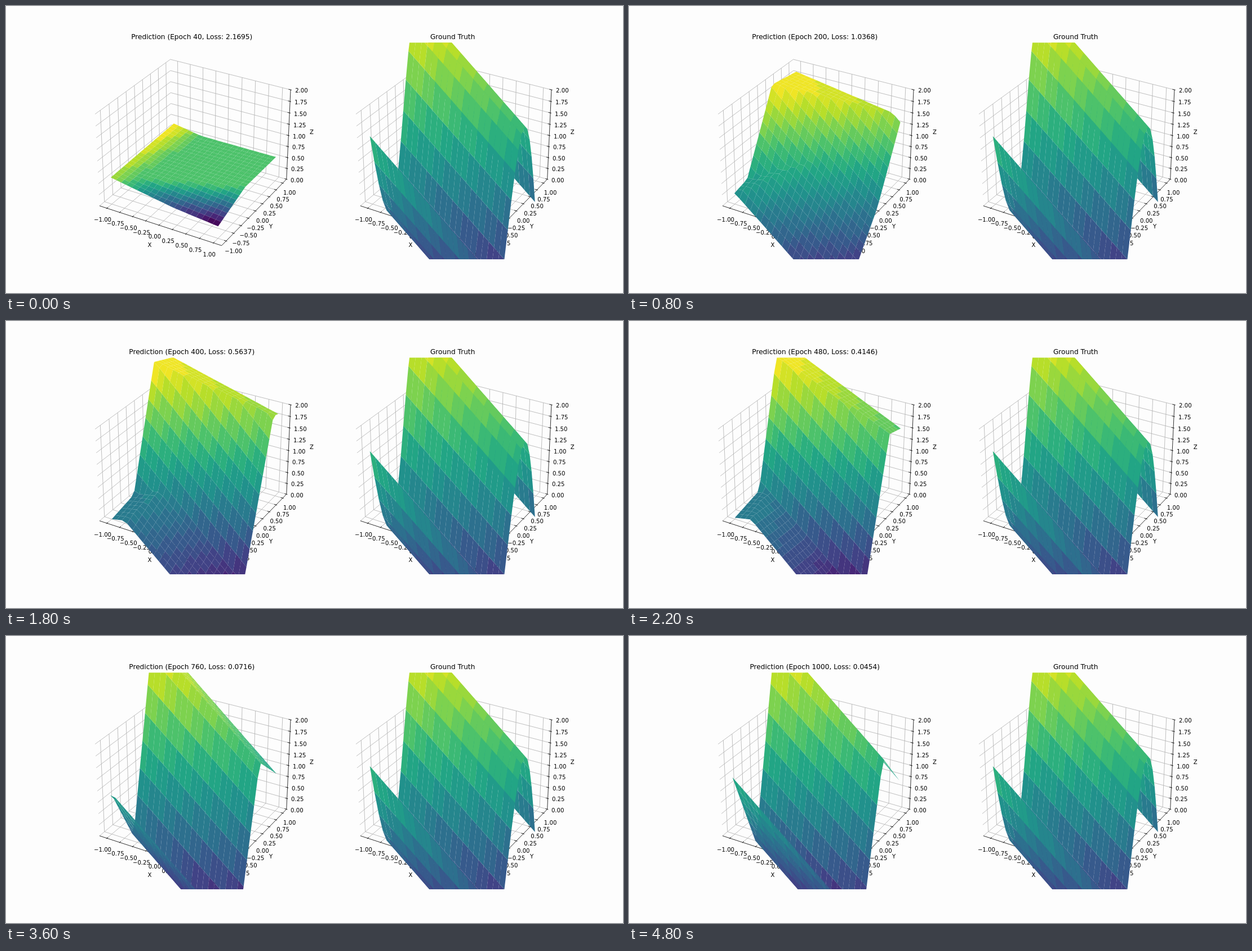
An HTML page with a canvas for the animation above (5 s loop, 1095 by 511 pixels).

```html
<!DOCTYPE html>
<html lang="en">
<head>
<meta charset="utf-8">
<title>Surface fit</title>
<style>
html, body { margin: 0; width: 100%; height: 100%; overflow: hidden; background: #fdfdfd; }
canvas { display: block; }
</style>
</head>
<body>
<canvas id="stage" width="1095" height="511"></canvas>
<script>
const ctx = document.getElementById('stage').getContext('2d');
const STEP = 200, FRAMES = 25;
const SIDE = 385.74, LEFT = 136.875, TOP = 65.18, GAP = 462.89;
const SCALE = SIDE / 0.185;
const N = 21, LEVELS = 23;
const EDGE = 25 / 24;              // pane position in box units
const TICK = 1 / 6;                // tick length unit
const LABEL = EDGE + 0.1209;       // tick labels
const NAME = EDGE + 0.2628;        // axis names
const FONT = '"DejaVu Sans", sans-serif';

// The fit is a steep wall between a floor and a roof.
// Each plane is [height at centre, slope in x, slope in y]; cap limits the floor.
const KEYS = [
  { at: 0, loss: 2.1695, cap: 0.6, floor: [0.43, -0.2, 0.03], wall: [0.7, -0.118, 0.316], roof: [0.55, 0, 0] },
  { at: 2, loss: 1.2680, cap: 0.43, floor: [0.7, -0.95, 1.35], wall: [0.7, -0.95, 1.35], roof: [1.25, -0.25, 0] },
  { at: 7, loss: 0.7665, cap: -0.03, floor: [0.27, -1.02, 1.1], wall: [0.07, -1.25, 2.85], roof: [2.6, -0.1, -0.35] },
  { at: 11, loss: 0.4146, cap: 0.03, floor: [-0.73, -1.09, -0.1], wall: [0.185, -1.03, 4.2], roof: [2.32, -0.55, -0.25] },
  { at: 14, loss: 0.2368, cap: 0.29, floor: [-1.14, -1.15, -0.7], wall: [0.5, -1, 5.2], roof: [2.68, -0.95, -0.69] },
  { at: 18, loss: 0.0716, cap: 0.87, floor: [-2.25, -1, -2.2], wall: [0.5, -1, 5.5], roof: [2.8, -1, -0.95] },
  { at: 24, loss: 0.0454, cap: 1.26, floor: [-2.74, -1, -3], wall: [0.5, -1, 5.6], roof: [3.03, -1, -1.33] }
];

const lerp = (a, b, k) => a + (b - a) * k;
const mix = (p, q, k) => p.map((v, i) => lerp(v, q[i], k));
const plane = (p, x, y) => p[0] + p[1] * x + p[2] * y;

function stateAt(frame) {
  const i = Math.max(1, KEYS.findIndex(key => key.at >= frame));
  const a = KEYS[i - 1], b = KEYS[i];
  const k = (frame - a.at) / (b.at - a.at);
  return {
    loss: a.loss * (b.loss / a.loss) ** k,
    cap: lerp(a.cap, b.cap, k),
    floor: mix(a.floor, b.floor, k),
    wall: mix(a.wall, b.wall, k),
    roof: mix(a.roof, b.roof, k)
  };
}

const predict = s => (x, y) => {
  const cap = s.cap + 0.25 * (x + 1) + 0.2 * (y + 1);
  return Math.max(
    Math.min(plane(s.floor, x, y), cap),
    Math.min(plane(s.wall, x, y), plane(s.roof, x, y)));
};

const truth = (x, y) => 2 * Math.sin(Math.PI * y) - x + 0.5;

const VIRIDIS = ['440154', '482475', '414487', '355f8d', '2a788e', '21918c',
  '22a884', '44bf70', '7ad151', 'bddf26', 'fde725']
  .map(h => [0, 2, 4].map(i => parseInt(h.slice(i, i + 2), 16)));

function tint(t) {
  const level = Math.min(LEVELS - 1, Math.floor(t * LEVELS));
  const pos = (level + 0.5) / LEVELS * 10, i = Math.floor(pos);
  return `rgb(${mix(VIRIDIS[i], VIRIDIS[i + 1], pos - i).map(Math.round)})`;
}

// Box units (-1..1 per axis) to screen, camera at elevation 30, azimuth -60.
const C = Math.sqrt(3) / 2;
function project(a, b, c) {
  const x = a * 4 / 7, y = b * 4 / 7, z = c * 3 / 7;
  const depth = 10 - (x * C / 2 - y * 0.75 + z / 2);
  const u = (x * C + y / 2) / depth;
  const v = (-x / 4 + y * C / 2 + z * C) / depth;
  return [LEFT + (u + 0.095) * SCALE, TOP + SIDE - (v + 0.095) * SCALE, depth];
}

const flat = v => v / 1.1;
const tall = v => (v - 1) * EDGE;

function path(points) {
  ctx.beginPath();
  for (const p of points) ctx.lineTo(p[0], p[1]);
}

function line(color, ...points) {
  path(points.map(p => project(...p)));
  ctx.strokeStyle = color;
  ctx.lineWidth = 0.81;
  ctx.stroke();
}

function text(str, x, y, size = 10.14) {
  ctx.font = `${size}px ${FONT}`;
  ctx.fillText(str, x, y);
}

const E = EDGE;
const AXES = [
  { name: 'X', unit: flat, from: -1, grid: v => [[v, -E, -E], [v, E, -E], [v, E, E]],
    at: (v, d) => [v, -d, -d], tick: (v, d) => [v, -d, -E] },
  { name: 'Y', unit: flat, from: -1, grid: v => [[E, v, -E], [-E, v, -E], [-E, v, E]],
    at: (v, d) => [d, v, -d], tick: (v, d) => [d, v, -E] },
  { name: 'Z', unit: tall, from: 0, grid: v => [[-E, -E, v], [-E, E, v], [E, E, v]],
    at: (v, d) => [d, d, v], tick: (v, d) => [d, E, v] }
];

function eachTick(axis, fn) {
  for (let i = 0; i < 9; i++) {
    const value = axis.from + i / 4;
    fn(axis.unit(value), value);
  }
}

function drawAxes() {
  for (const axis of AXES) eachTick(axis, v => line('#b0b0b0', ...axis.grid(v)));
  ctx.fillStyle = '#000';
  ctx.textAlign = 'center';
  for (const axis of AXES) {
    line('#000', axis.at(-E, E), axis.at(E, E));
    eachTick(axis, (v, value) => {
      line('#000', axis.tick(v, E + TICK * 0.1), axis.tick(v, E - TICK * 0.2));
      const [x, y] = project(...axis.at(v, LABEL));
      text(value.toFixed(2).replace('-', '\u2212'), x, y + 7.7);
    });
    const [x, y] = project(...axis.at(0, NAME));
    text(axis.name, x, y + 2.8);
  }
}

function drawSurface(fn) {
  const grid = [];
  for (let k = 0; k < N * N; k++) {
    const x = (k % N) / 10 - 1, y = Math.floor(k / N) / 10 - 1, z = fn(x, y);
    grid.push({ z, p: project(flat(x), flat(y), tall(z)) });
  }
  const cells = [];
  for (let j = 0; j < N - 1; j++) {
    for (let i = 0; i < N - 1; i++) {
      const k = j * N + i;
      const q = [grid[k], grid[k + 1], grid[k + N + 1], grid[k + N]];
      const mean = get => q.reduce((s, c) => s + get(c), 0) / 4;
      cells.push({ pts: q.map(c => c.p), z: mean(c => c.z), depth: mean(c => c.p[2]) });
    }
  }
  const zs = cells.map(c => c.z);
  const low = Math.min(...zs), high = Math.max(...zs);
  cells.sort((a, b) => b.depth - a.depth);
  ctx.save();
  ctx.beginPath();
  ctx.rect(LEFT, TOP, SIDE, SIDE);
  ctx.clip();
  for (const c of cells) {
    path(c.pts);
    ctx.fillStyle = tint((c.z - low) / (high - low));
    ctx.fill();
  }
  ctx.restore();
}

function drawPlot(offset, title, fn) {
  ctx.save();
  ctx.translate(offset, 0);
  drawAxes();
  text(title, LEFT + SIDE / 2, 59.1, 12.167);
  drawSurface(fn);
  ctx.restore();
}

function draw(frame) {
  const state = stateAt(frame);
  ctx.fillStyle = '#fdfdfd';
  ctx.fillRect(0, 0, 1095, 511);
  drawPlot(0, `Prediction (Epoch ${(frame + 1) * 40}, Loss: ${state.loss.toFixed(4)})`, predict(state));
  drawPlot(GAP, 'Ground Truth', truth);
}

const start = performance.now();
let shown = -1;
function tick() {
  const frame = Math.floor((performance.now() - start) / STEP) % FRAMES;
  if (frame !== shown) draw(shown = frame);
  requestAnimationFrame(tick);
}
tick();
</script>
</body>
</html>
```
